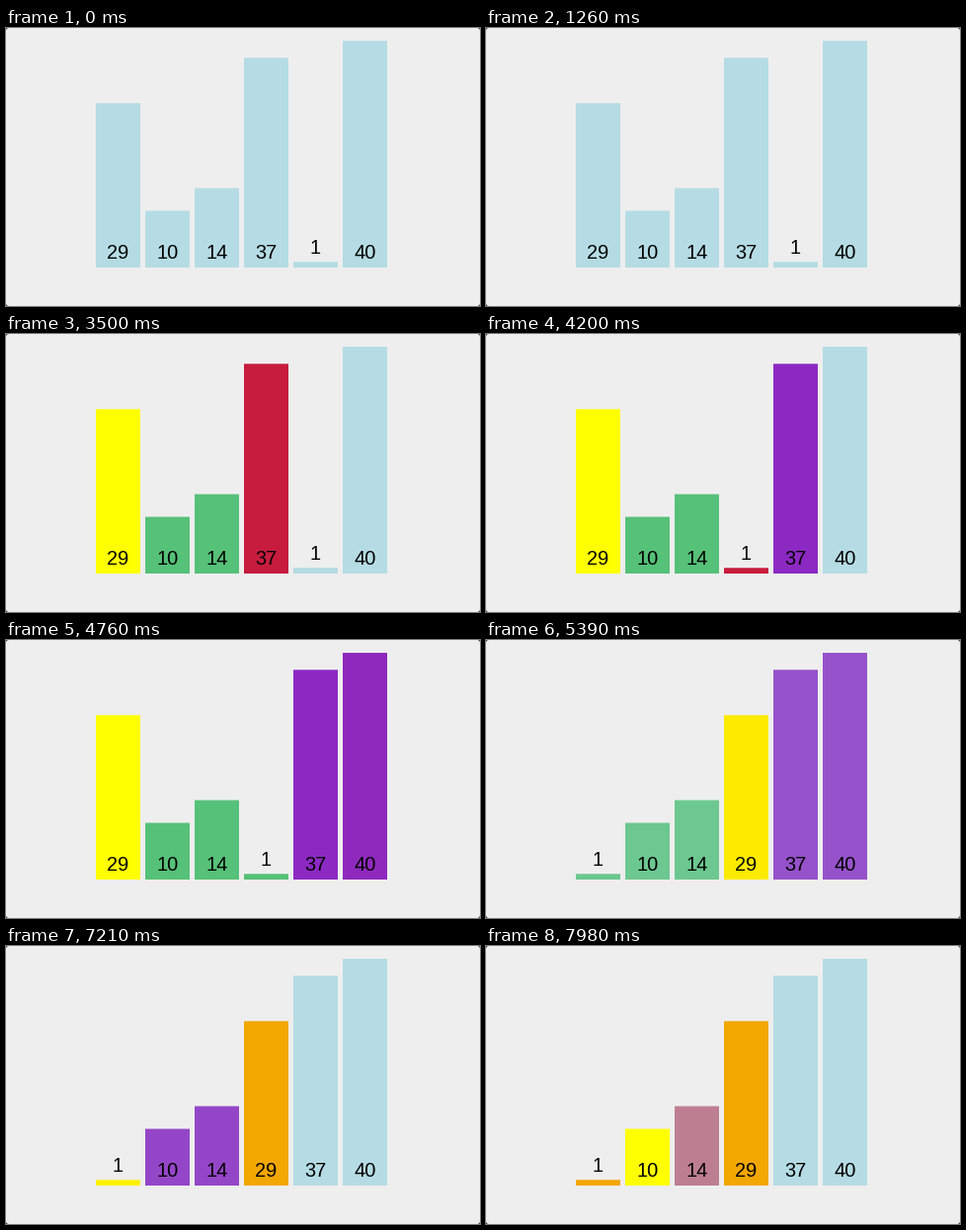
Animation, 480 px wide and 282 px high, one loop 8000 ms. Source, as a matplotlib script:

```python
import matplotlib.pyplot as plt
import numpy as np
from matplotlib.animation import FuncAnimation
from matplotlib.colors import to_rgb
from matplotlib.patches import FancyBboxPatch, Rectangle

W, H, DPI = 480, 282, 100
LOOP, TICK, HOLD = 8000, 20, 70      # ms: loop, timer, how long a pose is held
START, STEP, EASE = 1268, 366, 250   # ms: first step, step spacing, transition

BLUE, YELLOW, RED = "#b5dce4", "#ffff00", "#c81c3c"
GREEN, PURPLE, ORANGE = "#56c178", "#8d29c3", "#f2a600"

VALUES = [29, 10, 14, 37, 1, 40]
LEFT, PITCH, BAR_W = 91, 50, 45
FLOOR, UNIT = 243, 5.75

# Quicksort, one entry per step: value -> new colour, or a pair to swap.
STEPS = [
    {29: YELLOW},
    {10: RED},
    {},
    {10: GREEN, 14: RED},
    {},
    {14: GREEN, 37: RED},
    {37: PURPLE, 1: RED},
    (37, 1),
    {1: GREEN, 40: RED},
    {40: PURPLE},
    (29, 1),
    {29: ORANGE, 1: BLUE, 10: BLUE, 14: BLUE, 37: BLUE, 40: BLUE},
    {1: YELLOW},
    {10: RED},
    {10: PURPLE, 14: RED},
    {14: PURPLE},
    {1: ORANGE, 10: BLUE, 14: BLUE},
    {10: YELLOW},
    {14: RED},
]


def ease(u):
    """Cubic in-out."""
    u = min(max(u, 0), 1)
    return 4 * u**3 if u < 0.5 else 1 - 4 * (1 - u) ** 3


def mix(a, b, p):
    return a + (b - a) * p


def pose(t):
    """Slot and colour of every bar at time t."""
    slots = {v: float(i) for i, v in enumerate(VALUES)}
    colors = {v: np.array(to_rgb(BLUE)) for v in VALUES}
    for k, step in enumerate(STEPS):
        p = ease((t - START - k * STEP) / EASE)
        if p == 0:
            break
        if isinstance(step, tuple):
            a, b = step
            sa, sb = slots[a], slots[b]
            slots[a], slots[b] = mix(sa, sb, p), mix(sb, sa, p)
        else:
            for v, color in step.items():
                colors[v] = mix(colors[v], np.array(to_rgb(color)), p)
    return slots, colors


fig = plt.figure(figsize=(W / DPI, H / DPI), dpi=DPI, facecolor="#444444")
ax = fig.add_axes([0, 0, 1, 1])
ax.set_xlim(0, W)
ax.set_ylim(H, 0)
ax.axis("off")
ax.add_patch(FancyBboxPatch((0, 0), W, H, boxstyle="round,pad=0,rounding_size=3",
                            fc="#eeeeee", lw=0, zorder=0))

bars, labels = {}, {}
for i, v in enumerate(VALUES):
    height = v * UNIT
    bars[v] = ax.add_patch(Rectangle((0, FLOOR - height), BAR_W, height,
                                     lw=0, snap=False, zorder=2 * i + 1))
    # A label that does not fit in its bar sits above it.
    base = 234 if height > 20 else 229
    labels[v] = ax.text(0, base, str(v), ha="center", va="baseline",
                        family="Liberation Sans", size=20 * 72 / DPI,
                        color="black", zorder=2 * i + 2)


def draw(n):
    t = (n * TICK + TICK // 2) // HOLD * HOLD
    slots, colors = pose(t)
    for v in VALUES:
        x = LEFT + PITCH * slots[v]
        bars[v].set_x(x)
        bars[v].set_facecolor(colors[v])
        labels[v].set_x(x + BAR_W / 2)
    return [*bars.values(), *labels.values()]


anim = FuncAnimation(fig, draw, frames=LOOP // TICK, interval=TICK,
                     repeat=True, repeat_delay=0)
plt.show()
```
